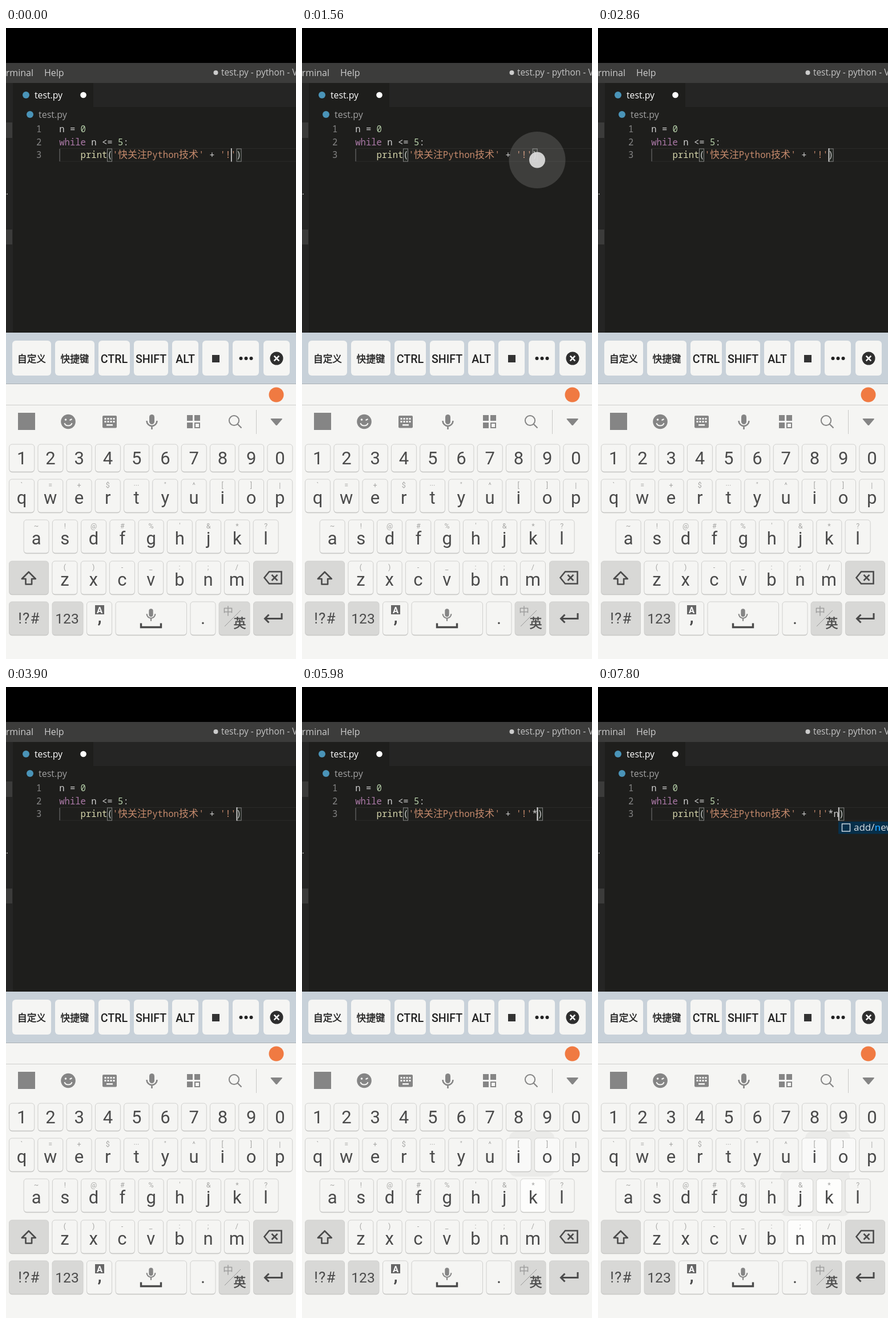
Animation, 508 px wide and 1102 px high, one loop 8000 ms. Source, as an HTML page:

```html
<!DOCTYPE html>
<html lang="zh">
<head>
<meta charset="utf-8">
<title>Coding on a phone</title>
<style>
html, body { margin: 0; width: 100%; height: 100%; overflow: hidden; background: #000; }
svg { display: block; width: 100%; height: 100%; }
text { white-space: pre; }
.ui { font-family: "Open Sans", "Noto Sans", sans-serif; }
.code { font-family: "Noto Sans Mono", "Noto Sans CJK SC", monospace; font-size: 15.6px; }
.code.han { font-size: 17px; }
.key { font-family: Roboto, "Noto Sans CJK SC", sans-serif; text-anchor: middle; }
</style>
</head>
<body>
<svg id="stage" viewBox="0 0 508 1102" preserveAspectRatio="none"></svg>
<script>
const LOOP = 8000;
const CELL = 9.35, LEFT = 93.2;
const INK = '#4b4b4b', ICON = '#858585', PAPER = '#f5f5f3';
const STR = '#c58a6c', FG = '#cfcfcf', NUM = '#b5cea8';
const stage = document.getElementById('stage');

const rect = (x, y, w, h, fill, more = '') =>
  `<rect x="${x}" y="${y}" width="${w}" height="${h}" fill="${fill}" ${more}/>`;
const circle = (x, y, r, fill, more = '') =>
  `<circle cx="${x}" cy="${y}" r="${r}" fill="${fill}" ${more}/>`;
const path = (d, stroke, width, more = '') =>
  `<path d="${d}" fill="none" stroke="${stroke}" stroke-width="${width}" ${more}/>`;
const esc = s => s.replace(/&/g, '&amp;').replace(/</g, '&lt;');
const text = (cls, x, y, s, fill, size, more = '') =>
  `<text class="${cls}" x="${x}" y="${y}" fill="${fill}" ${size ? `font-size="${size}"` : ''} ${more}>${esc(s)}</text>`;
const code = (x, y, s, fill = FG) => text('code', x, y, s, fill);
const col = n => LEFT + n * CELL;
// Visible only within the listed [from, to) spans, in ms
const timed = (spans, body) =>
  `<g data-on="${spans.map(s => s.join('-')).join(' ')}">${body}</g>`;

const bracket = x => rect(x, 211, 8, 22, '#20241f', 'stroke="#858585" stroke-width="1"');

function editor() {
  const bg = '#1e1e1c', side = '#252524', patch = '#3b3b3a';
  let s = rect(0, 0, 508, 61, '#000') + rect(0, 61, 508, 36, '#3c3c3b')
    + rect(0, 96, 508, 436, bg) + rect(153, 96, 355, 42, side)
    + rect(0, 96, 12, 436, side)
    + rect(0, 165, 11, 27, patch) + rect(0, 352, 11, 26, patch)
    + text('ui', 0, 291, '.', '#ccc', 15)
    + text('ui', 48, 84, 'Terminal', '#ccc', 16, 'text-anchor="end"')
    + text('ui', 67, 84, 'Help', '#ccc', 16)
    + circle(367.5, 78, 4, '#ccc')
    + text('ui', 377, 83, 'test.py - python - V', '#c4c4c4', 15.4)
    + circle(35, 117, 6, '#4a94b8') + text('ui', 50, 122.5, 'test.py', '#fff', 15.8, 'font-weight="500"')
    + circle(135.5, 117, 5.3, '#fff')
    + circle(42, 151, 6, '#4a94b8') + text('ui', 57, 157, 'test.py', '#a0a0a0', 16);
  [181.5, 204.5, 226.5].forEach((y, i) => s += code(53, y, String(i + 1), '#858585'));
  s += rect(94, 210, 414, 1, '#2b2b29') + rect(94, 232.5, 414, 1, '#2b2b29')
    + rect(93.5, 211, 1.2, 22, '#6a6a6a')
    + code(col(0), 181.5, 'n = ') + code(col(4), 181.5, '0', NUM)
    + code(col(0), 204.5, 'while', '#ad7aa9') + code(col(6), 204.5, 'n <= ')
    + code(col(11), 204.5, '5', NUM) + code(col(12), 204.5, ':')
    + bracket(177.5) + code(col(4), 226.5, 'print', '#d6d6ac') + code(col(9), 226.5, '(')
    + code(col(10), 226.5, "'", STR) + text('code han', 196, 226.5, '快关注', STR)
    + code(246.8, 226.5, 'Python', STR) + text('code han', 303, 226.5, '技术', STR)
    + code(337.6, 226.5, "'", STR) + code(356.3, 226.5, '+') + code(375, 226.5, "'!'", STR);

  const tail = (from, to, typed) => {
    const x = 403.1 + typed.length * CELL;
    return timed([[from, to]], bracket(x + 1) + code(403.1, 226.5, typed + ')'));
  };
  s += tail(0, 5980, '') + tail(5980, 7800, '*') + tail(7800, LOOP, '*n');

  const caret = (x, ...spans) => timed(spans, rect(x, 210, 1.6, 23.5, '#d6d6d6'));
  s += caret(394, [0, 520]) + caret(411.5, [780, 1040])
    + caret(403.7, [2860, 3120], [3900, 4160], [4940, 5200], [5720, 5980])
    + caret(411.4, [5980, 6500], [7020, 7800]) + caret(420.8, [7800, LOOP]);

  return s + timed([[7800, LOOP]],
    rect(421, 235, 87, 21.5, '#062f4a')
    + rect(427.5, 239, 14, 13, 'none', 'stroke="#d8e2ea" stroke-width="1.4"')
    + `<text class="ui" x="448" y="251" font-size="17" fill="#d8dde2">add/<tspan fill="#1c9bf5" font-weight="600">n</tspan>ew</text>`);
}

function touches() {
  const dot = (x, y) => circle(x, y, 17.5, '#fff', 'opacity=".22"')
    + circle(x, y, 14.2, '#e0e0e0', 'opacity=".8"');
  const ring = (x, y, r) => circle(x, y, r, '#fff', 'opacity=".14"');
  return timed([[520, 780]], ring(416.5, 228.5, 36) + dot(416.5, 228.5))
    + timed([[1300, 1560]], dot(412, 230.5))
    + timed([[1560, 1820]], ring(412, 230.5, 49.5) + circle(412, 230.5, 14, '#dcdcdc', 'opacity=".92"'))
    + timed([[2340, 2600]], dot(403, 230))
    + timed([[2600, 2860]], ring(402.5, 229.5, 53) + dot(402.5, 229.5));
}

function shortcuts() {
  let s = rect(0, 532, 508, 90, '#c8d1d9');
  const spots = [[11, 68], [86, 69], [162, 55], [224, 60], [291, 46], [344, 46], [397, 46], [451, 46]];
  const names = ['自定义', '快捷键', 'CTRL', 'SHIFT', 'ALT'];
  spots.forEach(([x, w], i) => {
    s += rect(x, 546, w, 61, PAPER, 'rx="6"');
    if (!names[i]) return;
    s += i < 2
      ? text('key', x + w / 2, 583.5, names[i], '#222', 16.7, 'stroke="#222" stroke-width=".45"')
      : text('key', x + w / 2, 584.5, names[i], '#222', 19.6, 'font-weight="500"');
  });
  s += rect(361, 571, 13, 13, '#333');
  for (const x of [411.5, 420.5, 429.5]) s += circle(x, 577, 3, '#222');
  return s + circle(474, 577, 11.5, '#2e2e2e')
    + path('M469.7 572.7l8.6 8.6m0-8.6l-8.6 8.6', '#fff', 2.6);
}

function mic(x, y, k) {
  return `<g transform="translate(${x} ${y}) scale(${k})">` + rect(-4.5, -13, 9, 17, ICON, 'rx="4.5"')
    + path('M-9-2a9 9 0 0 0 18 0M0 7v6', ICON, 2.6) + '</g>';
}

function toolbar() {
  let s = rect(0, 622, 508, 480, PAPER) + rect(0, 621, 508, 1, '#a9afb4')
    + circle(473.5, 640.5, 13, '#f07a42') + rect(0, 658, 508, 1, '#cfcfcd')
    + rect(21, 672, 30, 30, ICON)
    + circle(109, 687.5, 12.8, ICON) + circle(104.5, 684, 1.8, PAPER)
    + path('M111.5 685l4-2M102.5 690a6.7 6 0 0 0 13 0', PAPER, 2)
    + rect(169, 677, 25, 21.5, ICON, 'rx="2"');
  for (let i = 0; i < 8; i++) s += rect(172.5 + i % 4 * 5, 681 + (i >> 2) * 5, 3, 3, PAPER);
  return s + rect(176, 692, 11, 2.6, PAPER) + mic(255.5, 688, 1)
    + rect(317, 676, 10, 10, ICON) + rect(330, 676, 10, 10, ICON) + rect(317, 689, 10, 10, ICON)
    + rect(331, 690, 8, 8, 'none', `stroke="${ICON}" stroke-width="2"`)
    + circle(399.5, 685.5, 8.6, 'none', `stroke="${ICON}" stroke-width="2"`)
    + path('M405.5 691.5l7 7', ICON, 2.2)
    + rect(438, 667, 1, 42, '#c9c9c7')
    + `<path d="M463.5 683q0-1 1.5-1h17.5q1.5 0 1.5 1l-9 10.5q-1 1-2.5 0z" fill="${ICON}"/>`;
}

function cap(x, y, w, h, fill = PAPER) {
  return rect(x, y + 1.2, w, h, '#c2c2c0', 'rx="5"')
    + rect(x, y, w, h, fill, 'rx="5" stroke="#d0d0ce" stroke-width="1"');
}

function keyboard() {
  const rows = [
    ['1234567890', '', 5.7, 727, 48],
    ['qwertyuiop', ['`', '=', '+', '$', '···', '"', '^', '[', ']', '|'], 5.5, 788, 58],
    ['asdfghjkl', "~!@#%'&*?", 31.1, 859, 58],
    ['zxcvbnm', '()-_:;/', 80.9, 931, 58]
  ];
  // Lit keys keep a lighter face after the bubble has left
  const lit = { i: 5980, o: 5980, k: 5720, j: 7540, n: 7280 };
  let s = timed([[5980, LOOP]], rect(363, 776, 79, 79, '#ebebe9', 'rx="12"'))
    + timed([[7540, LOOP]], rect(319, 845, 122, 79, '#ebebe9', 'rx="12"'));
  for (const [keys, hints, x0, y, h] of rows) {
    [...keys].forEach((k, i) => {
      const x = x0 + i * 50.25, mid = x + 22;
      s += cap(x, y, 44, h);
      if (lit[k]) s += timed([[lit[k], LOOP]],
        rect(x + .5, y + .5, 43, h - 1, 'kn'.includes(k) ? '#fdfdfc' : '#f9f9f8', 'rx="5"'));
      s += text('key', mid, y + (hints ? 42.5 : 35), k, INK, 31);
      if (hints) s += text('key', mid, y + 15, hints[i], '#a6a6a4', 12.5);
    });
  }
  const dark = '#d8d8d6';
  s += cap(5.5, 931, 69, 58, dark) + cap(433.5, 931, 69, 58, dark)
    + path('M39.8 950l-12 12h6.7v9.5h10.6v-9.5h6.7z', INK, 2.6, 'stroke-linejoin="round"')
    + path('M461 949.5h21.5v21h-21.5l-8.5-10.5zM465.5 955l10 10m0-10l-10 10', INK, 2.6);
  for (const [x, w, fill] of [[5.5, 69, dark], [81, 54, dark], [141.5, 44], [192, 124.5], [323, 44], [373, 54, dark], [433.5, 69, dark]])
    s += cap(x, 1002, w, 58, fill);
  return s + text('key', 40.5, 1040, '!?#', INK, 26, 'letter-spacing="1.2"')
    + text('key', 107, 1040, '123', INK, 24.5)
    + rect(156, 1008, 16, 16, '#666') + text('key', 164, 1021.5, 'A', '#fff', 15, 'font-weight="700"')
    + text('key', 164, 1039, ',', INK, 32, 'font-weight="500"')
    + mic(254, 1025, .82) + path('M236.5 1039.5v7h35v-7', INK, 3.4)
    + text('key', 345, 1041, '.', INK, 31)
    + text('key', 389, 1025, '中', '#999', 18) + path('M383 1045l28-28', '#999', 1)
    + text('key', 409.5, 1047, '英', INK, 22, `stroke="${INK}" stroke-width=".5"`)
    + path('M483 1022v9.5h-29M460.5 1024.5l-7 7 7 7', INK, 3);
}

function bubbles() {
  const bubble = (from, to, x, y, w, label) => timed([[from, to]],
    rect(x, y, w, 79, '#e4e4e2', 'rx="12"') + rect(x + 4, y + 4, w - 8, 69, '#fff', 'rx="8"')
    + text('key', x + w / 2, y + 51, label, INK, 38));
  return bubble(5720, 5980, 364, 776, 78, '*') + bubble(7280, 7540, 318, 845, 73, 'n');
}

stage.innerHTML = editor() + touches() + shortcuts() + toolbar() + keyboard() + bubbles();

const parts = [...stage.querySelectorAll('[data-on]')].map(el => ({
  el, spans: el.dataset.on.split(' ').map(s => s.split('-').map(Number))
}));

function draw(t) {
  for (const { el, spans } of parts)
    el.style.display = spans.some(([a, b]) => t >= a && t < b) ? '' : 'none';
}

const start = performance.now();
function tick() {
  draw((performance.now() - start) % LOOP);
  requestAnimationFrame(tick);
}
draw(0);
requestAnimationFrame(tick);
</script>
</body>
</html>
```
